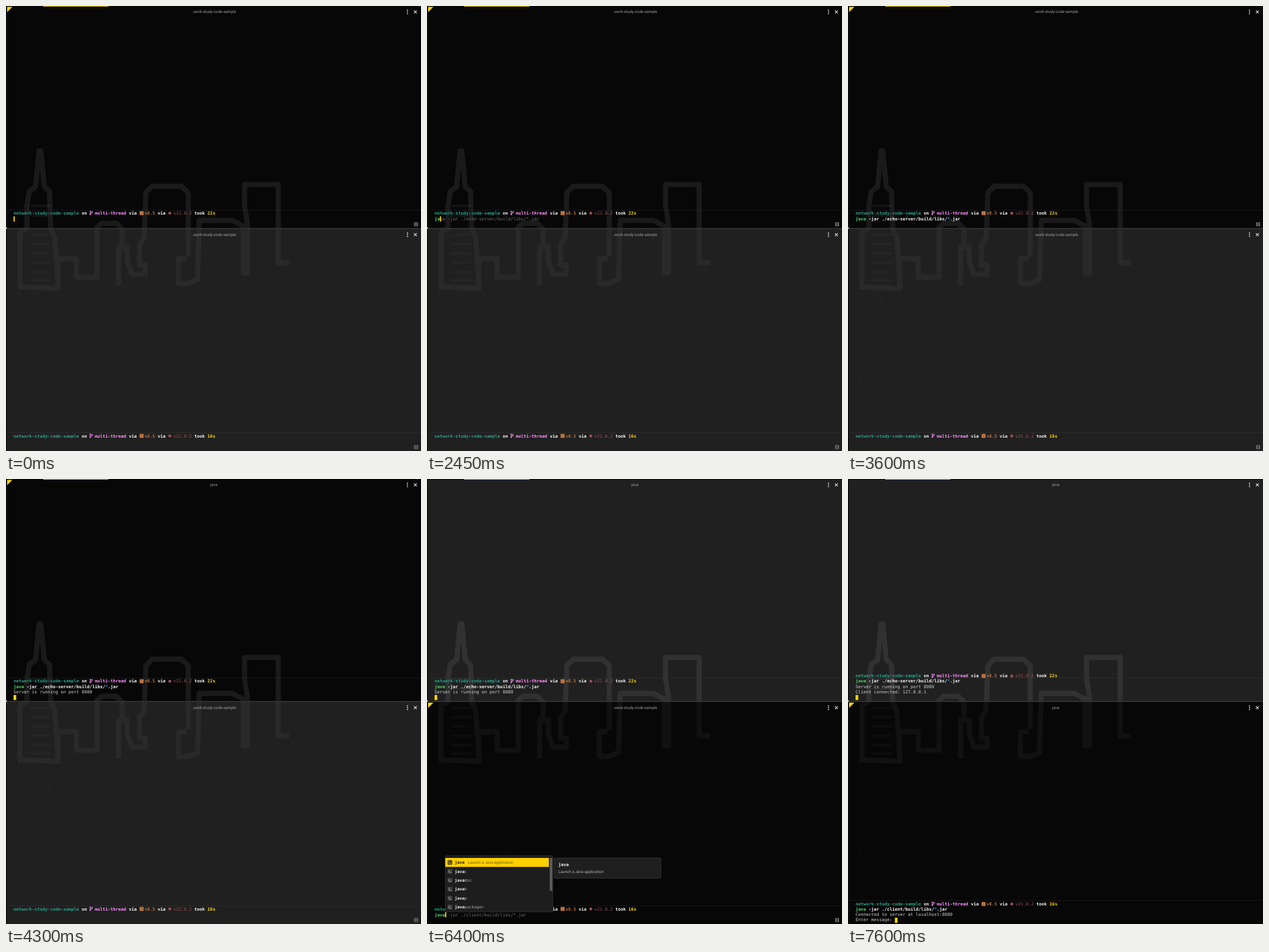
Recreate the animation shown at these times as an HTML page. Size 715 px wide and 768 px high, loop 8 s.

```html
<!DOCTYPE html>
<html lang="en">
<head>
<meta charset="utf-8">
<title>Terminal panes</title>
<style>
  html, body { margin: 0; width: 100%; height: 100%; overflow: hidden; background: #000; }
  svg { display: block; width: 715px; height: 768px; text-rendering: geometricPrecision; }
  text { white-space: pre; font: 6.75px Roboto, sans-serif; }
  .m { font: 7.5px "DejaVu Sans Mono", monospace; }
  .s { font-size: 7px; }
  .b { font-weight: bold; }
</style>
</head>
<body>
<svg id="stage" viewBox="0 0 715 768"></svg>
<script>
const LOOP = 8000, LEFT = 13, CHAR = 4.515, LINE = 9.05, PANE = 384.5;
const C = {
  yellow: '#ffd600', teal: '#2aa08a', pink: '#ff8ffd', orange: '#b8703f', red: '#9c4f56',
  green: '#58d36c', blue: '#2b8fe0', white: '#f4f4f4', grey: '#d0d0d0', ghost: '#6c6c6c'
};
const TITLE = '..work-study-code-sample';
const SERVER = 'java -jar ./echo-server/build/libs/*.jar';
const CLIENT = 'java -jar ./client/build/libs/*.jar';

const JAVA_MENU = {
  key: 'java', about: 'Launch a Java application', bar: 57, shell: true,
  rows: [['java', 'Launch a Java application'], ['javac'], ['javadoc'], ['javah'], ['javap'], ['javapackager']]
};
const FLAG_MENU = {
  key: '-jar', about: 'To launch the main class in a JAR file', bar: 43,
  rows: [
    ['-jar', 'To launch the main class in a JAR file'],
    ['-D', 'Set a system property, -D&lt;NAME>=&lt;VALUE>'],
    ['--classpath', 'Class search path of directories and zip'],
    ['--dry-run', 'Create VM and load main class but do not'],
    ['--help', 'Show help for java'],
    ['--show-version', 'Print product version to the output']
  ]
};

const col = n => LEFT + n * CHAR;
const rect = (x, y, w, h, fill, more = '') =>
  `<rect x="${x}" y="${y}" width="${w}" height="${h}" fill="${fill}" ${more}/>`;
const text = (x, y, s, fill, cls = '', more = '') =>
  `<text x="${x}" y="${y}" fill="${fill}" class="${cls}" ${more}>${s}</text>`;
const mono = (n, y, s, fill, bold = true) => text(col(n), y, s, fill, bold ? 'm b' : 'm');
const path = (d, stroke, w, more = '') =>
  `<path d="${d}" fill="none" stroke="${stroke}" stroke-width="${w}" ${more}/>`;

// Value of the last step reached at time t.
const at = (t, first, ...steps) => steps.reduce((v, [ms, next]) => t >= ms ? next : v, first);

function skyline() {
  const tower = 'M24 485V390L36 384V346L40 320L51 312L57 250H60L66 312L75 320L77 384L84 400L90 487Z';
  const floors = [345, 362, 395, 411, 427, 443, 459, 474].map(y => `M42 ${y}H76`).join('');
  const blocks = 'M89 487V436H121V468H157V382L165 375H190L200 385V412'
    + 'M194 482V416H209V440L217 463H240V447H230V412L238 400L241 322L252 311H302L314 322V432'
    + 'M311 436H297V479H313L330 472L333 370H390L409 380V461H416V376L411 345V308H469V443H488';
  const slopes = 'M45 490L85 550L135 600M95 495L175 600M55 600L100 640M92 600L150 650V672'
    + 'M300 485L550 600M410 548L510 600M430 600L600 668M475 605L645 670M22 488V735';
  return path(tower + blocks, '#fff', 9, 'opacity=".038" stroke-linejoin="round"')
    + path(floors, '#fff', 4, 'opacity=".022"')
    + path(slopes, '#fff', 1.5, 'opacity=".02"');
}

function prompt(y, took) {
  const x = col(29);
  return mono(0, y, 'network-study-code-sample', C.teal) + mono(26, y, 'on', C.white)
    + path(`M${x + 1.2} ${y - 5}V${y}M${x + 4.3} ${y - 4.6}V${y - 3.5}Q${x + 4.3} ${y - 2.3} ${x + 1.2} ${y - 1.8}`, C.pink, 1.1)
    + `<g fill="${C.pink}"><circle cx="${x + 1.2}" cy="${y - 5.3}" r="1.1"/><circle cx="${x + 4.3}" cy="${y - 5}" r="1.1"/><circle cx="${x + 1.2}" cy="${y}" r="1.1"/></g>`
    + mono(31, y, 'multi-thread', C.pink) + mono(44, y, 'via', C.white)
    + rect(col(48) + .4, y - 6, 7, 7, C.orange, 'rx=".8"')
    + mono(50, y, 'v8.5', C.orange) + mono(55, y, 'via', C.white)
    + `<circle cx="${col(59) + 2.8}" cy="${y - 2.4}" r="2.5" fill="${C.red}"/>`
    + mono(61, y, 'v21.0.2', C.red, false) + mono(69, y, 'took', C.white) + mono(74, y, took, C.yellow);
}

function command(y, s) {
  const star = s.indexOf('*');
  let out = mono(0, y, s.slice(0, 4), C.green);
  if (s.length > 4) out += mono(4, y, star < 0 ? s.slice(4) : s.slice(4, star), C.white);
  if (star > 0) out += mono(star, y, '*', C.blue) + mono(star + 1, y, s.slice(star + 1), C.white);
  return out;
}

function menu(m, x, id) {
  const top = 265.5;
  let out = rect(x, top, 185.5, 97, '#1d1d1d', 'rx="2" stroke="#353535" stroke-width=".8"')
    + rect(x, top + 4, 178.5, 15.5, '#ffd000')
    + rect(x + 180, top + 4, 4.5, m.bar, '#5c5c5c', 'rx="1"')
    + `<clipPath id="${id}"><rect x="${x}" y="${top}" width="178" height="97"/></clipPath><g clip-path="url(#${id})">`;
  m.rows.forEach(([name, about], i) => {
    const y = top + 11.8 + i * 15.4, ix = x + 4, tx = x + 16.3;
    out += rect(ix, y - 4, 8, 8, i ? '#434343' : '#5a4c0c', 'rx="1"');
    out += m.shell
      ? path(`M${ix + 1.6} ${y - 1.8}l1.7 1.6l-1.7 1.6M${ix + 4} ${y + 2}h2.4`, '#ccc', .8)
      : `<path d="M${ix + 2} ${y + 2.6}v-5h4.2l-1 1.6l1 1.6h-3.2v1.8z" fill="#ddd"/>`;
    if (m.shell) {
      out += text(tx, y + 2.3, 'java', i ? C.white : '#1d1800', 'm s b')
        + text(tx + 16.86, y + 2.3, name.slice(4), '#aaa', 'm s');
    } else {
      out += text(tx, y + 2.3, name, i ? '#b5b5b5' : '#4a3e00', 'm s');
    }
    if (about) out += text(tx + name.length * 4.214 + 6, y + 2.4, about, i ? '#777' : '#6b5a00');
  });
  const dx = x + 187.5;
  return out + '</g>' + rect(dx, top + 4, 184, 35, '#1f1f1f', 'rx="2" stroke="#3a3a3a" stroke-width=".8"')
    + text(dx + 7.3, top + 17.7, m.key, C.white, 'm b')
    + text(dx + 7.3, top + 30, m.about, '#b4b4b4');
}

function pane(p) {
  const running = p.lines !== null;
  const edge = p.id === 'b' ? -.5 : 0;
  const base = running ? 360.5 - LINE * Math.max(0, p.lines.length - p.inline) : 360;
  const rule = Math.max(343, base - 8.5);
  let out = rect(1, edge, 714, 384, p.active ? '#070707' : '#202020')
    + `<g transform="translate(0 ${-p.y})">${skyline()}</g>`
    + rect(1, Math.round(rule) + edge, 714, 1, p.active ? '#171717' : '#2b2b2b')
    + rect(1, edge, 1, 384, '#1b1b1b')
    + text(358, 12.4, p.title, '#a2a2a2', '', 'text-anchor="middle"')
    + [6.9, 10.1, 13.3].map(y => `<circle cx="691.7" cy="${y}" r="1" fill="#e6e6e6"/>`).join('')
    + path('M702.8 7.6l5 5m0 -5l-5 5', '#f0f0f0', 1.1);
  if (p.active) out += `<path d="M2 1.5H11L2 10.5Z" fill="${C.yellow}"/>`;
  out += prompt(base, p.took);
  if (running) {
    out += command(base + LINE, p.cmd);
    p.lines.forEach((s, i) => { out += mono(0, base + LINE * (i + 2), s, C.grey, false); });
    const x = p.inline ? col(p.lines[p.lines.length - 1].length) : LEFT;
    return out + rect(x, 372.8, 4.6, 8.7, C.yellow);
  }
  out += rect(703, 373.3, 7, 7, '#686868', 'rx="1"')
    + path('M704.5 375.3h1.4m1.2 0h1.4M704.5 378.3h1.4m1.2 0h1.4M706.5 374.5v4.6', '#1b1b1b', .8);
  if (p.typed) out += mono(p.typed, 370, p.cmd.slice(p.typed), C.ghost, false) + command(370, p.cmd.slice(0, p.typed));
  if (p.menu) out += menu(p.menu, col(p.typed) + .4, 'clip-' + p.id);
  if (p.cursor) out += rect(col(p.typed) + (p.typed ? .2 : 0), 363, 2, 9, C.yellow);
  return out;
}

function frame(t) {
  const second = t >= 5300;
  const top = {
    id: 'a', y: 0, active: !second, took: '22s', cmd: SERVER, inline: 0,
    title: at(t, TITLE, [4200, 'java']),
    typed: at(t, 0, [2300, 1], [2400, 2], [2500, 3], [2600, 4], [2850, 5], [3100, SERVER.length]),
    menu: at(t, null, [2650, JAVA_MENU], [2850, null], [2900, FLAG_MENU], [3100, null]),
    cursor: at(t, true, [400, false], [900, true], [1400, false], [1900, true], [3600, false], [4100, true]),
    lines: at(t, null, [4150, []], [4300, ['Server is running on port 8080']],
      [7500, ['Server is running on port 8080', 'Client connected: 127.0.0.1']])
  };
  const lines = at(t, null, [7300, []], [7500, ['Connected to server at localhost:8080']],
    [7550, ['Connected to server at localhost:8080', 'Enter message: ']]);
  const bottom = {
    id: 'b', y: PANE, active: second, took: '16s', cmd: CLIENT, lines,
    inline: lines && lines.length === 2 ? 1 : 0,
    title: at(t, TITLE, [7400, 'java']),
    typed: at(t, 0, [5950, 1], [6000, 2], [6100, 3], [6150, 4], [6700, CLIENT.length]),
    menu: at(t, null, [6300, JAVA_MENU], [6700, null]),
    cursor: at(t, false, [5300, true], [5800, false], [5950, true])
  };
  return pane(top) + `<g transform="translate(0 ${PANE})">${pane(bottom)}</g>`
    + rect(0, 383, 715, 2, '#303030') + rect(0, 382, 1.5, 2.5, '#c8c8c8')
    + rect(0, 0, 715, 1, '#050505') + rect(64, 0, 112.5, 1, C.yellow);
}

const stage = document.getElementById('stage');
let shown = '';
function tick(now) {
  const next = frame(now % LOOP);
  if (next !== shown) stage.innerHTML = shown = next;
  requestAnimationFrame(tick);
}
tick(0);
</script>
</body>
</html>
```
